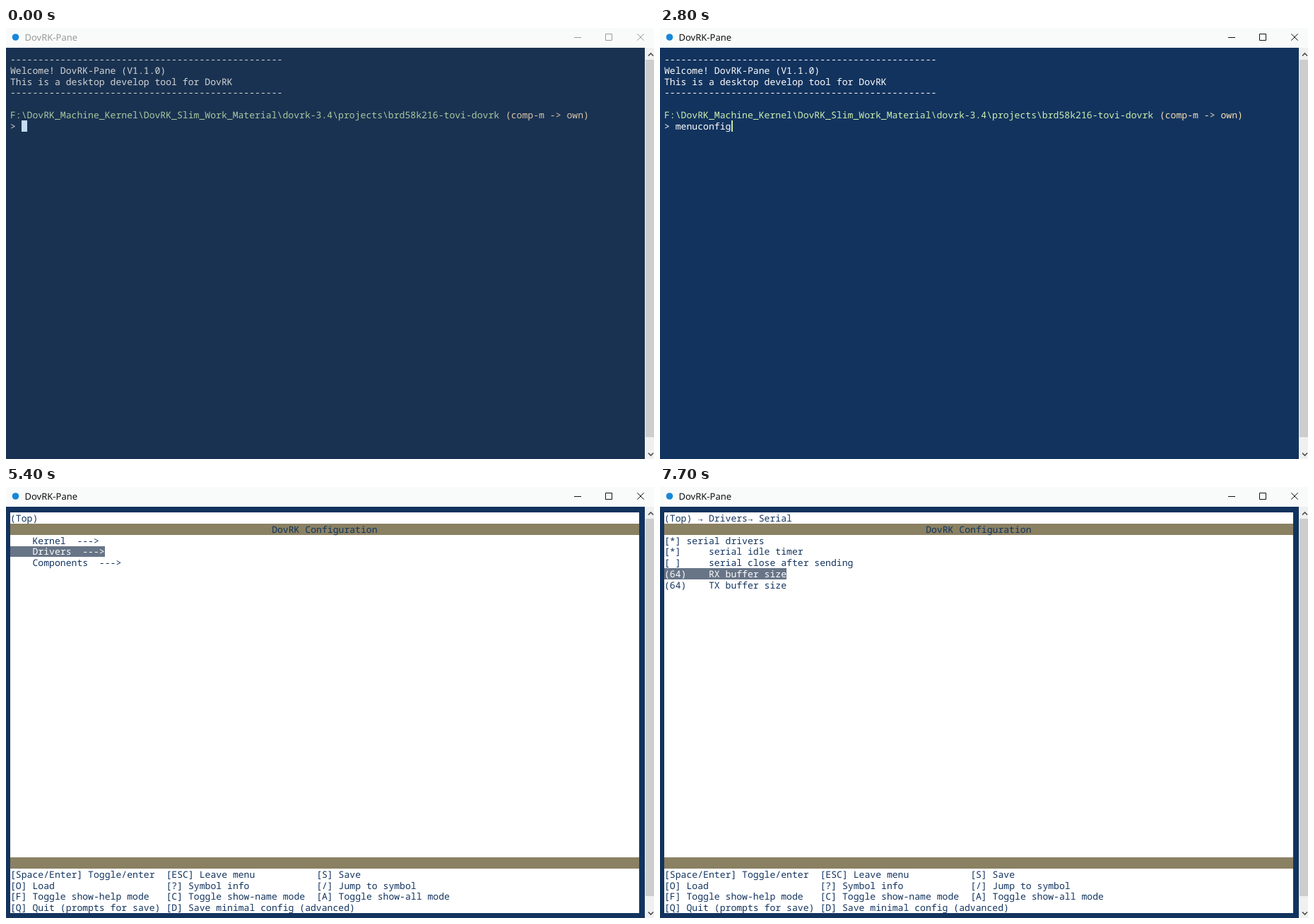
An HTML page for the animation above (8 s loop, 917 px wide and 611 px high).

```html
<!DOCTYPE html>
<html lang="en">
<head>
<meta charset="utf-8">
<title>Terminal</title>
<style>
  html, body { margin: 0; width: 100%; height: 100%; overflow: hidden; }
  svg { display: block; width: 917px; height: 611px; }
  text { white-space: pre; text-rendering: geometricPrecision; }
  #screen text { font: 13.125px "Noto Sans Mono", "DejaVu Sans Mono", monospace; }
  #name { font: 13px "Noto Sans", "Open Sans", sans-serif; }
</style>
</head>
<body>
<svg viewBox="0 0 917 611">
  <rect id="back" width="917" height="611"/>
  <g id="screen"></g>
  <rect width="917" height="28" fill="#f9fbfb"/>
  <circle cx="13.5" cy="13" r="4.8" fill="#1787d8"/>
  <text id="name" x="26.5" y="18">DovRK-Pane</text>
  <path id="buttons" fill="none" d="M804 13.5h10M848.5 8.5h9v9h-9zM893.3 8.3l9.4 9.4m0-9.4l-9.4 9.4"/>
  <rect x="904" y="28" width="13" height="583" fill="#f0f0f0"/>
  <rect x="905" y="45" width="12" height="535" fill="#cdcdcd"/>
  <path d="M909 39.5l3.5-3.5 3.5 3.5M909 602.5l3.5 3.5 3.5-3.5" fill="none" stroke="#505050" stroke-width="1.7"/>
</svg>
<script>
const LOOP = 8000, CELL = 7.875, ROW = 15.77, LEFT = 6, TOP = 36.4, COLS = 113;
const NAVY = '#12335e', KHAKI = '#8a8163', SLATE = '#687587';
const COMMAND = 'menuconfig';
const $ = id => document.getElementById(id);

const esc = s => s.replace(/&/g, '&amp;').replace(/</g, '&lt;').replace(/>/g, '&gt;');
const colX = col => Math.round(LEFT + col * CELL);
const rowY = row => Math.round(TOP + row * ROW);
const write = (col, row, str, fill) =>
  `<text x="${LEFT + col * CELL}" y="${Math.round(TOP + row * ROW + 12.7)}" fill="${fill}">${esc(str)}</text>`;
const block = (col, row, width, fill, rows = 1) =>
  `<rect x="${colX(col)}" y="${rowY(row)}" width="${Math.round(width)}" height="${rowY(row + rows) - rowY(row)}" fill="${fill}"/>`;

const PATH = 'F:\\DovRK_Machine_Kernel\\DovRK_Slim_Work_Material\\dovrk-3.4\\projects\\brd58k216-tovi-dovrk';
const RULE = '-'.repeat(49);
const HELP = [
  ['[Space/Enter] Toggle/enter', '[ESC] Leave menu', '[S] Save'],
  ['[O] Load', '[?] Symbol info', '[/] Jump to symbol'],
  ['[F] Toggle show-help mode', '[C] Toggle show-name mode', '[A] Toggle show-all mode'],
  ['[Q] Quit (prompts for save)', '[D] Save minimal config (advanced)', '']
];
const submenus = names => names.split(' ').map(n => `    ${n}  --->`);
const MENUS = {
  top: ['(Top)', submenus('Kernel Drivers Components')],
  drivers: ['(Top) → Drivers', submenus('Device Console Serial Timer LPMGR ADC HAL')],
  serial: ['(Top) → Drivers→ Serial', [
    '[*] serial drivers',
    '[*]     serial idle timer',
    '[ ]     serial close after sending',
    '(64)    RX buffer size',
    '(64)    TX buffer size'
  ]]
};

// [start, menu, selected item]
const STEPS = [
  [4200, 'top', 0], [5400, 'top', 1], [5500, 'drivers', 0], [6300, 'drivers', 1],
  [6500, 'drivers', 2], [6700, 'serial', 0], [7300, 'serial', 1], [7500, 'serial', 2], [7700, 'serial', 3]
];

function typedCount(t) {
  if (t < 1800) return 0;
  if (t < 2300) return t < 1900 ? 1 : t < 2100 ? 2 : 3;
  return Math.min(10, Math.round(4 + 1.2 * Math.floor((t - 2300) / 100)));
}

function prompt(t) {
  const active = t >= 1200, n = typedCount(t);
  const ink = active ? '#fff' : '#d2d5d6';
  let out = [RULE, 'Welcome! DovRK-Pane (V1.1.0)', 'This is a desktop develop tool for DovRK', RULE]
    .map((line, row) => write(0, row, line, ink)).join('');
  out += write(0, 5, PATH, active ? '#cdefaf' : '#a8c8a0')
    + write(89, 5, '(comp-m -> own)', active ? '#f7dfb5' : '#d8c6aa')
    + write(0, 6, '> ' + COMMAND.slice(0, n), ink);
  if (!active) return out + block(2, 6, 8, '#c5dcf5');
  if (t >= 3600 && t < 4100) return out + block(0, 7, 2, '#c8e8a4');
  const blinkedOff = t >= 1700 && t < 1800 || t >= 3300;
  return blinkedOff ? out : out + block(2 + n, 6, 2, '#c8e8a4');
}

function menu(t) {
  const [, key, selected] = STEPS.filter(s => s[0] <= t).pop();
  const [trail, items] = MENUS[key];
  const wide = COLS * CELL;
  let out = block(0, 0, wide, '#fff', 36) + block(0, 1, wide, KHAKI) + block(0, 31, wide, KHAKI)
    + write(0, 0, trail, NAVY) + write(47, 1, 'DovRK Configuration', NAVY);
  items.forEach((item, i) => {
    const on = i === selected;
    if (on) out += block(0, i + 2, item.length * CELL, SLATE);
    out += write(0, i + 2, item, on ? '#fff' : NAVY);
  });
  HELP.forEach((line, i) => line.forEach((s, j) => out += write([0, 28, 55][j], 32 + i, s, NAVY)));
  return out;
}

let shown = '';
function draw() {
  const t = performance.now() % LOOP, active = t >= 1200;
  const html = t < 4200 ? prompt(t) : menu(t);
  if (html !== shown) {
    $('screen').innerHTML = shown = html;
    $('back').setAttribute('fill', active ? NAVY : '#1a3251');
    $('name').setAttribute('fill', active ? '#111' : '#999');
    $('buttons').setAttribute('stroke', active ? '#111' : '#999');
  }
  requestAnimationFrame(draw);
}
draw();
</script>
</body>
</html>
```
